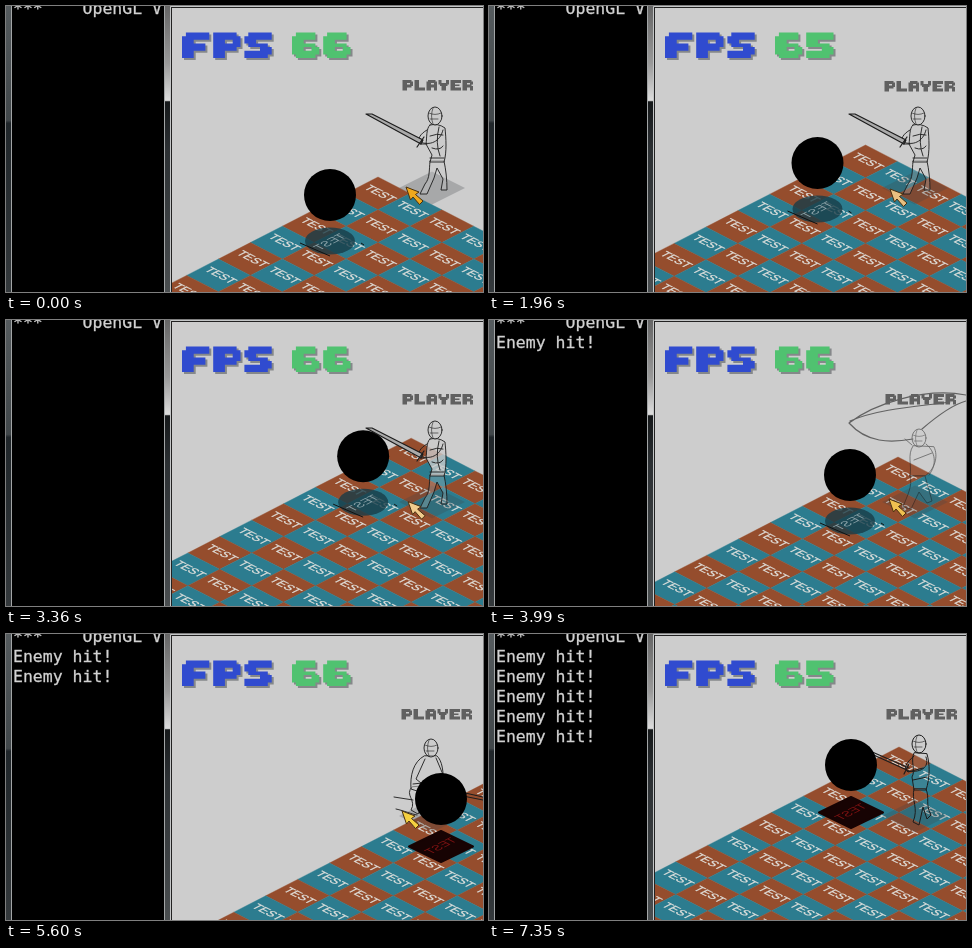
These frames come from a looping animation (477 px wide and 286 px high, 7420 ms). An HTML page:

```html
<!DOCTYPE html>
<html lang="en">
<head>
<meta charset="utf-8">
<title>Isometric sword test</title>
<style>
html, body { margin: 0; width: 100%; height: 100%; overflow: hidden; background: #000; }
svg { display: block; width: 477px; height: 286px; }
.console text { font: 16.5px "DejaVu Sans Mono", "Noto Sans Mono", monospace; fill: #d2d2d2; stroke: #d2d2d2; stroke-width: .3px; white-space: pre; }
.tile { font: 33px "Liberation Sans", Arial, sans-serif; text-anchor: middle; }
</style>
</head>
<body>
<svg id="stage" viewBox="0 0 477 286" xmlns="http://www.w3.org/2000/svg">
  <defs>
    <linearGradient id="leftEdge" x2="0" y2="1">
      <stop offset="0" stop-color="#555b5e"/><stop offset=".4" stop-color="#41474a"/>
      <stop offset=".41" stop-color="#20262a"/><stop offset="1" stop-color="#34393c"/>
    </linearGradient>
    <linearGradient id="gap" x2="0" y2="1">
      <stop offset="0" stop-color="#666"/><stop offset=".2" stop-color="#999"/>
      <stop offset=".33" stop-color="#ddd"/><stop offset=".335" stop-color="#15181a"/>
      <stop offset=".5" stop-color="#2c3033"/><stop offset="1" stop-color="#4a4e50"/>
    </linearGradient>
    <clipPath id="consoleClip"><path d="M6 0H157V286H6Z"/></clipPath>
    <clipPath id="gameClip"><path d="M166 2H477V286H166Z"/></clipPath>
  </defs>
  <rect width="5" height="286" fill="url(#leftEdge)"/>
  <path d="M5.5 0V286M158.5 0V286" stroke="#a2a5a6"/>
  <rect x="159" width="6" height="286" fill="url(#gap)"/>
  <g id="console" class="console" clip-path="url(#consoleClip)"><text x="7" y="8" xml:space="preserve">***    OpenGL V</text></g>
  <rect x="165" width="312" height="286" fill="#222"/>
  <rect x="166" y="2" width="311" height="284" fill="#cdcdcd"/>
  <path d="M164.500 286V.5H477" fill="none" stroke="#c4c6c7"/>
  <g clip-path="url(#gameClip)">
    <g id="floor"></g>
    <path d="M426 165.500 459 182 426 198.500 393 182Z" fill="#404448" opacity=".27"/>
    <g id="player" stroke="#1c1c1c" stroke-linejoin="round" stroke-linecap="round"></g>
    <g id="enemy">
      <g id="softShadow">
        <ellipse cy="65" rx="25" ry="13.500" fill="#183c48" opacity=".8"/>
        <path d="M-30 67 0 80M31 67l3 2" stroke="#111"/>
      </g>
      <path id="hitShadow" d="M0 51 32 66.500 0 82-32 66.500Z" fill="#170303" stroke="#170303" stroke-width="2" stroke-linejoin="round"/>
      <text id="enemyText" class="tile" transform="translate(0 66) matrix(-.32 .164 .32 .164 0 0)" y="10">TEST</text>
      <circle cy="19" r="26"/>
    </g>
    <g id="label"></g>
    <path id="cursor" d="M0 0 13 5 9.500 7.500 17 14 13.500 17.500 7 10 4.500 13Z" stroke="#4a3010"/>
  </g>
  <g id="fpsWord"></g>
  <g id="fpsValue"></g>
</svg>
<script>
const LOOP = 7420, STEP = 70;
const TILE = { w: 31.9, h: 16.4, count: 15, colors: ['#954d2d', '#2c7c8f'] };
const $ = id => document.getElementById(id);

function add(parent, tag, attrs = {}, text = '') {
  const node = document.createElementNS('http://www.w3.org/2000/svg', tag);
  for (const key in attrs) node.setAttribute(key, attrs[key]);
  node.textContent = text;
  return parent.appendChild(node);
}

// Block letters on a 7 x 7 cell with one unit between letters.
const GLYPHS = {
  F: 'M1 0H7V2H3V3H6V5H3V7H0V1H1Z',
  P: 'M0 0H6V1H7V4H6V5H3V7H0ZM3 2V3H5V2Z',
  S: 'M1 0H7V2H3V3H6V4H7V6H6V7H0V5H4V4H1V3H0V1H1Z',
  6: 'M1 0H6V2H3V3H6V4H7V6H6V7H1V6H0V1H1ZM3 4V5H5V4Z',
  5: 'M0 0H7V2H3V3H6V4H7V6H6V7H0V5H4V4H0Z',
  L: 'M0 0H3V5H7V7H0Z',
  A: 'M1 0H6V1H7V7H5V5H3V7H0V1H1ZM3 2V3H5V2Z',
  Y: 'M0 0H2V2H5V0H7V3H6V4H5V7H2V4H1V3H0Z',
  E: 'M0 0H7V2H3V3H6V4H3V5H7V7H0Z',
  R: 'M0 0H6V1H7V3H6V4H7V7H5V5H3V7H0ZM3 2V3H5V2Z'
};

function blockText(parent, word, x, y, scale, fill) {
  const group = add(parent, 'g', { fill, 'aria-label': word, transform: `translate(${x} ${y}) scale(${scale})` });
  [...word].forEach((c, i) => add(group, 'path', { d: GLYPHS[c], 'fill-rule': 'evenodd', transform: `translate(${i * 8})` }));
}

function shadedText(parent, word, x, color) {
  const group = add(parent, 'g');
  blockText(group, word, x + 2, 28.5, '3.9 3.65', '#85888a');
  blockText(group, word, x, 26.5, '3.9 3.65', color);
  return group;
}

shadedText($('fpsWord'), 'FPS', 176, '#304bcf');
const fpsViews = {};
for (const value of ['66', '65']) fpsViews[value] = shadedText($('fpsValue'), value, 286, '#50c270');
blockText($('label'), 'PLAYER', 0, 0, 1.5, '#606060');

for (let i = 0; i < TILE.count; i++) {
  for (let j = 0; j < TILE.count; j++) {
    const { w, h } = TILE;
    const tile = add($('floor'), 'g', { transform: `translate(${(i - j) * w} ${(i + j + 1) * h})` });
    const fill = TILE.colors[(i + j) % 2];
    add(tile, 'path', { d: `M0 ${-h}L${w} 0 0 ${h} ${-w} 0Z`, fill, stroke: fill, 'stroke-width': .4 });
    add(tile, 'text', {
      class: 'tile', fill: '#e2e2de', stroke: '#e2e2de', 'stroke-width': .8,
      x: 3, y: 7, transform: 'matrix(.32 .164 -.32 .164 0 0)'
    }, 'TEST');
  }
}

const POSES = {
  idle: {
    head: [429, 110],
    body: 'M424 119C420 122 421 132 420 138L426 149 424 156H438C441 146 440 132 439 122Q432 117 424 119Z',
    legs: 'M424 155C423 165 424 172 419 178L414 188H421L428 172 431 162 437 173 435 184H441C441 174 440 164 438 155Z',
    lines: 'M421 124C414 128 411 133 414 138L421 138M437 124C434 136 424 140 414 136M424 130Q431 127 437 129M426 142Q434 145 437 140M433 121Q429 137 434 150M424 152H438',
    sword: 'M415 138 360 108 366 108 417 134ZM411 141 418 131',
    weight: .9, fill: .8
  },
  raised: {
    head: [428, 110],
    body: 'M424 118C419 127 428 134 424 143L422 152C428 148 435 152 439 156C441 143 442 130 439 119Z',
    legs: 'M422 152C416 158 417 164 426 164L414 188H421L432 169C440 165 440 158 435 152Z',
    lines: 'M424 121C418 113 421 104 430 103L444 112M439 122C445 122 447 117 442 113L433 115M424 131Q432 124 439 128M424 143 438 149M421 160Q430 154 438 160M427 165 435 182 428 188M431 121Q436 132 430 148',
    sword: 'M441 115H477M441 117.500 477 118M441 111V122',
    weight: 1.2, fill: .08
  },
  slash: {
    head: [430, 118],
    body: 'M424 126C418 135 423 145 421 156H436C445 150 450 137 445 127Z',
    legs: 'M421 156C424 166 418 176 414 187L422 189 430 172 438 183 443 181 436 156Z',
    lines: 'M437 124C447 132 448 145 440 155M423 125 416 119M425 140 443 133',
    sword: 'M477 75C435 67 385 84 360 103C378 123 401 123 424 119M477 81C462 85 447 97 433 109M361 101C391 88 435 86 461 82',
    weight: .8, fill: .15, opacity: .6
  },
  crouch: {
    head: [425, 114],
    body: 'M418 122C407 128 404 142 405 155L420 160 437 151C438 138 436 126 431 122Z',
    legs: 'M406 153C398 161 411 166 405 176L412 180 423 163 433 172 438 182 444 180 437 151Z',
    lines: 'M419 125 410 145 425 157M430 124 438 143 425 157M407 150 435 147M388 163 407 166M390 175C399 177 405 180 411 181',
    sword: 'M437 154 477 163M437 158 477 166',
    weight: .9, fill: .5
  },
  lunge: {
    head: [427, 115],
    body: 'M421 122C410 128 411 141 409 150L424 155 439 146C438 133 437 126 433 122Z',
    legs: 'M411 149C405 162 416 166 411 180L417 184 426 165 437 176 443 174 438 147Z',
    lines: 'M422 126 416 142 436 151M433 125 440 141 430 151M411 148 435 139M416 160 439 156',
    sword: 'M434 149 477 162M434 152 477 167M438 145 434 156',
    weight: .9, fill: .3
  },
  guard: {
    head: [430, 110],
    body: 'M425 119C421 127 427 136 423 143L425 156H437C441 144 441 130 438 120Z',
    legs: 'M425 155C422 166 430 174 424 188L430 191 434 173 438 185 442 181C436 170 441 164 437 155Z',
    lines: 'M425 122C417 129 414 134 419 138L434 134M437 123C441 134 431 139 418 137M424 146 438 143',
    sword: 'M420 137 378 118M420 134 381 117M415 140 420 130',
    weight: 1, fill: .1
  }
};

const poseViews = {};
for (const name in POSES) {
  const { head: [cx, cy], body, legs, lines, sword, weight, fill, opacity = 1 } = POSES[name];
  const group = poseViews[name] = add($('player'), 'g', { fill: '#cbcbcb', 'stroke-width': weight, opacity });
  add(group, 'path', { d: legs, 'fill-opacity': fill / 3 });
  add(group, 'path', { d: body, 'fill-opacity': fill });
  add(group, 'path', { d: lines, fill: 'none' });
  add(group, 'path', { d: sword, fill: name === 'idle' ? '#aaa' : 'none', 'stroke-width': 1.2 });
  add(group, 'ellipse', { cx, cy, rx: 7, ry: 9, 'fill-opacity': fill });
  add(group, 'path', { d: `M${cx - 6} ${cy - 3}q6 3 12 0M${cx - 2} ${cy - 8}q-3 8 0 16M${cx - 5} ${cy + 3}h8`, fill: 'none', 'stroke-width': .6 });
}

// Time followed by values; motion is linear between neighbours.
const FLOOR_PATH = [
  [770, 374, 170], [1120, 376, 158], [1260, 376, 158], [1960, 378.5, 138], [2800, 401, 87],
  [3710, 411, 136], [4200, 411, 136], [5600, 485, 146], [6720, 436, 144], [7070, 424, 128],
  [7210, 424, 128], [7350, 412, 112]
];
const CURSOR_PATH = [
  [770, 400, 181, 240, 168, 28], [1960, 401, 183, 232, 192, 128], [2800, 404, 184, 240, 214, 196],
  [3990, 400, 179, 240, 192, 80], [5600, 396, 177, 245, 208, 64], [6720, 405, 182, 238, 184, 80]
];
const POSE_TIMES = [
  [0, 'idle'], [2240, 'raised'], [3010, 'idle'], [3640, 'raised'], [3850, 'slash'], [4130, 'idle'],
  [4410, 'raised'], [4550, 'slash'], [4760, 'crouch'], [5740, 'raised'], [5950, 'slash'],
  [6160, 'lunge'], [6510, 'slash'], [6650, 'lunge'], [7070, 'guard']
];
const FPS_TIMES = [[0, 66], [980, 65], [2380, 66], [7280, 65]];
const HITS = [3920, 4550, 5950, 6580, 7280];
const hitLines = HITS.map((_, i) => add($('console'), 'text', { x: 7, y: 28 + i * 20 }, 'Enemy hit!'));

const latest = (track, t) => track.filter(([start]) => start <= t).pop()[1];

function sample(track, t) {
  const next = track.findIndex(([time]) => time > t);
  if (next < 1) return (next ? track[track.length - 1] : track[0]).slice(1);
  const a = track[next - 1], b = track[next], k = (t - a[0]) / (b[0] - a[0]);
  return a.slice(1).map((v, i) => v + (b[i + 1] - v) * k);
}

const show = (node, on) => node.setAttribute('display', on ? 'inline' : 'none');
const move = (node, x, y) => node.setAttribute('transform', `translate(${x} ${y})`);

function render(t) {
  const [x, y] = sample(FLOOR_PATH, t);
  move($('floor'), x - 2, y + 1);
  move($('enemy'), x - 50, y);

  const pose = latest(POSE_TIMES, t), fps = latest(FPS_TIMES, t);
  for (const name in poseViews) show(poseViews[name], name === pose);
  for (const value in fpsViews) show(fpsViews[value], +value === fps);
  hitLines.forEach((line, i) => show(line, t >= HITS[i]));

  const hurt = t >= HITS[1];
  show($('softShadow'), !hurt);
  show($('hitShadow'), hurt);
  $('enemyText').setAttribute('fill', hurt ? '#7c1212' : '#8ba3a9');

  const [cx, cy, ...rgb] = sample(CURSOR_PATH, t);
  move($('cursor'), cx, cy);
  $('cursor').setAttribute('fill', `rgb(${rgb.map(Math.round)})`);
  show($('cursor'), t < 7070);

  const sway = t < 770 ? 0 : Math.round(-Math.sin((t - 2800) / 595 * Math.PI));
  move($('label'), 396.5 + sway, 74 + Math.abs(sway));
}

const origin = performance.now();
function tick(now) {
  const t = Math.max(0, now - origin) % LOOP;
  render(Math.floor(t / STEP) * STEP);
  requestAnimationFrame(tick);
}
render(0);
requestAnimationFrame(tick);
</script>
</body>
</html>
```
